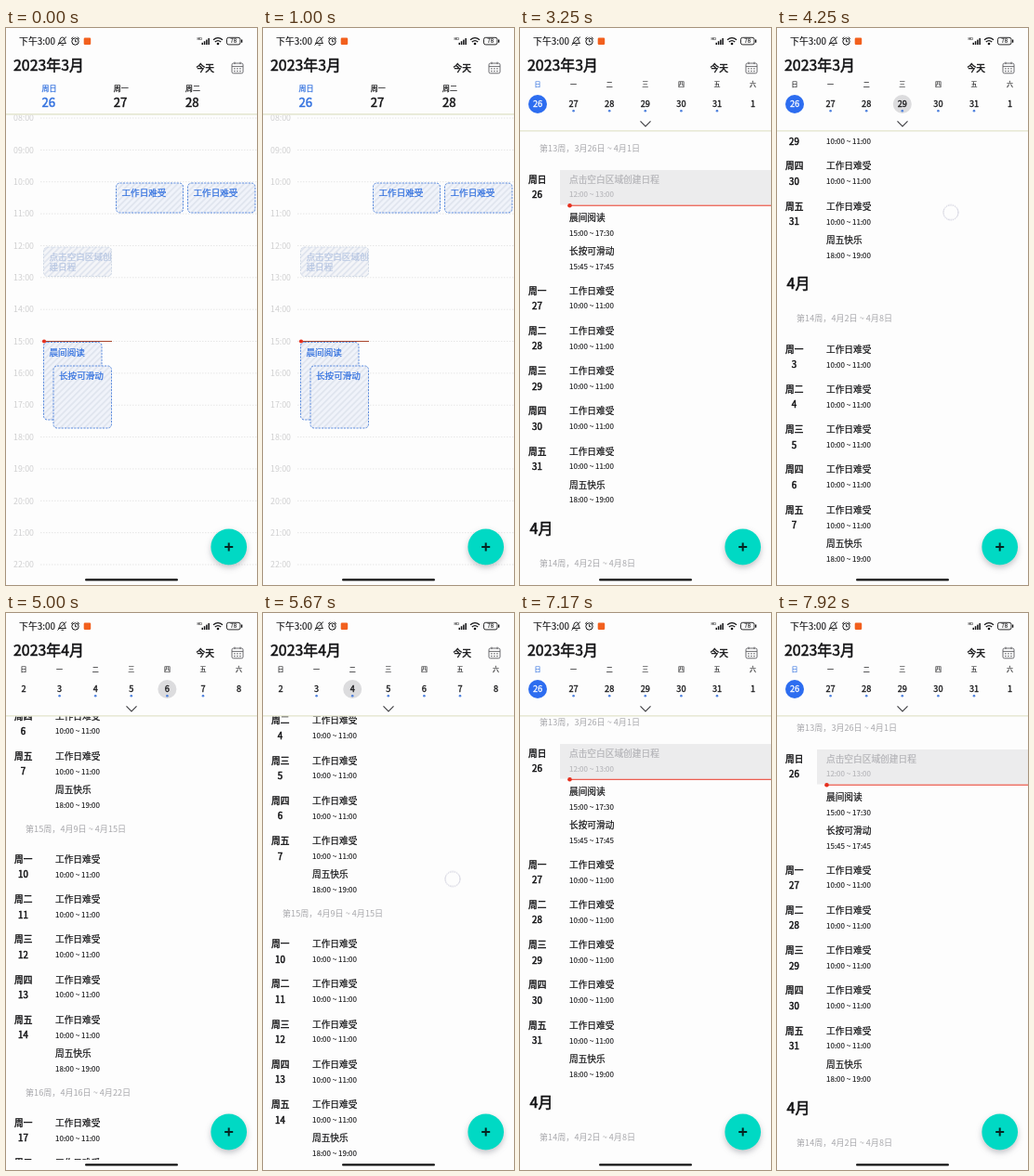
An HTML page for the animation above (8 s loop, 270 by 600 pixels).

```html
<!DOCTYPE html>
<html lang="zh-CN">
<head>
<meta charset="utf-8">
<title>日历</title>
<style>
  html, body { margin: 0; width: 100%; height: 100%; overflow: hidden; background: #fdfdfd; }
  svg { display: block; width: 100vw; height: 100vh; font-family: "Noto Sans CJK SC", "Noto Sans CJK", "Noto Sans", sans-serif; }
  #days, #agenda, #menu, #ripple, #list, #finger { animation: 8s linear infinite; }
  #days { animation-name: days; }
  #agenda { animation-name: agenda; }
  #menu { animation-name: menu; }
  #ripple { animation-name: ripple; }
  #list { animation-name: scroll; }
  #finger { animation-name: finger; }
  @keyframes days { 0%, 29.3% { visibility: visible } 29.31%, 100% { visibility: hidden } }
  @keyframes agenda { 0%, 29.3% { visibility: hidden } 29.31%, 100% { visibility: visible } }
  @keyframes menu {
    0%, 17.5% { opacity: 0; transform: translateY(-6px) }
    19.5%, 27.6% { opacity: 1; transform: none }
    29.3%, 100% { opacity: 0; transform: none }
  }
  @keyframes ripple {
    0%, 24.8% { opacity: 0; transform: scale(.3) }
    26%, 27% { opacity: 1; transform: scale(1) }
    28.5%, 100% { opacity: 0; transform: scale(1.8) }
  }
  @keyframes scroll {
    0%, 42.75% { transform: translateY(0); animation-timing-function: cubic-bezier(.4, 0, .8, .8) }
    53.125% { transform: translateY(-263px); animation-timing-function: cubic-bezier(.25, .4, .5, 1) }
    61.25% { transform: translateY(-625px) }
    66.25% { transform: translateY(-640px); animation-timing-function: cubic-bezier(.5, 0, .8, .6) }
    70.875% { transform: translateY(-538px) }
    75.625% { transform: translateY(-340px) }
    81.25% { transform: translateY(-160px); animation-timing-function: cubic-bezier(.25, .6, .4, 1) }
    93%, 100% { transform: translateY(-6px) }
  }
  @keyframes finger {
    0%, 42.7% { opacity: 0; transform: translate(187px, 462px) }
    42.75% { opacity: 1; transform: translate(187px, 462px); animation-timing-function: cubic-bezier(.4, 0, .8, .8) }
    53.125% { opacity: 1; transform: translate(187px, 199px) }
    53.8% { opacity: 0; transform: translate(187px, 180px) }
    66.2% { opacity: 0; transform: translate(204px, 184px) }
    66.25% { opacity: 1; transform: translate(204px, 184px); animation-timing-function: cubic-bezier(.5, 0, .8, .6) }
    70.875% { opacity: 1; transform: translate(204px, 286px) }
    75.625% { opacity: 1; transform: translate(204px, 484px) }
    76%, 100% { opacity: 0; transform: translate(204px, 490px) }
  }
</style>
</head>
<body>
<svg id="stage" viewBox="0 0 270 600"></svg>
<script>
const BG = '#fdfdfd', INK = '#121214', BLUE = '#3170df', PALE = '#cfcfd0', RED = '#e5301f', DIVIDER = '#e8e9d6';
const WEEKDAYS = '日一二三四五六';
const FIRST = 26, MARCH_END = 31;

const rect = (x, y, w, h, fill, extra = '') =>
  `<rect x="${x}" y="${y}" width="${w}" height="${h}" fill="${fill}" ${extra}/>`;
const circle = (x, y, r, fill, extra = '') =>
  `<circle cx="${x}" cy="${y}" r="${r}" fill="${fill}" ${extra}/>`;
const line = (d, color, width = 1, extra = '') =>
  `<path d="${d}" fill="none" stroke="${color}" stroke-width="${width}" ${extra}/>`;

// y is the visual middle of the glyphs; heavy adds a medium weight
const text = (x, y, str, size, { fill = INK, heavy = 0.22, anchor = 'start' } = {}) =>
  `<text x="${x}" y="${y + size * .37}" font-size="${size}" fill="${fill}"
    stroke="${fill}" stroke-width="${heavy}" text-anchor="${anchor}">${str}</text>`;

const dayNumber = d => d > MARCH_END ? d - MARCH_END : d;
const month = d => d > MARCH_END ? 4 : 3;
const dateLabel = d => `${month(d)}月${dayNumber(d)}日`;

function eventBox(x, y, w, h, lines, faded) {
  const edge = faded ? '#cdd6e4' : '#4f83dc', fill = faded ? '#b7c6e2' : BLUE;
  const shape = 'rx="4"';
  return rect(x, y, w, h, faded ? '#f4f5f8' : '#f0f3fa', shape) +
    rect(x, y, w, h, 'url(#hatch)', `${shape} stroke="${edge}" stroke-width=".9" stroke-dasharray="2.2 1.2"`) +
    lines.map((s, i) => text(x + 6, y + 10.5 + i * 11, s, 9.6, { fill })).join('');
}

function threeDays() {
  let out = '';
  for (let hour = 8; hour <= 22; hour++) {
    const y = 97 + (hour - 8) * 34.36;
    out += text(8, y, String(hour).padStart(2, '0') + ':00', 8.8, { fill: PALE, heavy: 0 }) +
      line(`M37 ${y}H270`, '#e0e0e0', .8, 'stroke-dasharray="1.5 1.5"');
  }
  out += eventBox(118.5, 167, 72, 32, ['工作日难受']) +
    eventBox(195.5, 167, 72.5, 32, ['工作日难受']) +
    eventBox(40.5, 236, 73, 31.5, ['点击空白区域创', '建日程'], true) +
    eventBox(40.5, 338.5, 62.5, 83.5, ['晨间阅读']) +
    eventBox(51, 364, 62.5, 67, ['长按可滑动']) +
    line('M41 337.5H114', '#a8452c', 1) + circle(41, 337.5, 2.1, RED) +
    rect(0, 0, 270, 92.5, BG) + rect(0, 92, 270, 1.8, DIVIDER);
  [0, 1, 2].forEach(i => {
    const x = 38.5 + i * 77.2, fill = i ? INK : BLUE;
    out += text(x, 65.5, '周' + WEEKDAYS[i], 8, { fill }) +
      text(x, 80, FIRST + i, 13.2, { fill, heavy: .45 });
  });
  return out;
}

const agendaDays = [];
const entry = (y, name, time, fill = INK) =>
  text(53, y, name, 9.7, { fill }) + text(53, y + 16.5, time, 8, { fill, heavy: .1 });
const dayLabel = (d, y) =>
  text(9, y, '周' + WEEKDAYS[(d - FIRST) % 7], 9.7, { heavy: .4 }) +
  text(18.5, y + 16.5, dayNumber(d), 9.7, { anchor: 'middle', heavy: .5 });

function agendaList() {
  let out = rect(43, 153, 227, 37.5, '#ececed') + dayLabel(FIRST, 163) +
    entry(163, '点击空白区域创建日程', '12:00 ~ 13:00', '#b4b4b8') +
    line('M53 191.2H270', RED, 1) + circle(53.5, 191.2, 2.3, RED) +
    entry(204.8, '晨间阅读', '15:00 ~ 17:30') +
    entry(240.8, '长按可滑动', '15:45 ~ 17:45') +
    text(10.5, 539, '4月', 16, { heavy: .6 });
  for (let week = 0; week < 4; week++) {
    const sunday = FIRST + week * 7, monday = week ? 326 + 284 * week : 283;
    out += text(21, week ? monday - 33 : 130,
      `第${13 + week}周，${dateLabel(sunday)} ~ ${dateLabel(sunday + 6)}`, 9.1, { fill: '#a8a8ac', heavy: 0 });
    for (let i = 0; i < 5; i++) {
      const y = monday + i * 43.25, d = sunday + 1 + i;
      agendaDays.push({ d, y });
      out += dayLabel(d, y) + entry(y, '工作日难受', '10:00 ~ 11:00');
    }
    out += entry(monday + 209, '周五快乐', '18:00 ~ 19:00');
  }
  return out;
}

function weekStrip(current) {
  const sunday = FIRST + 7 * Math.floor((current - FIRST) / 7);
  let out = '';
  for (let i = 0; i < 7; i++) {
    const x = 19 + i * 38.6, d = sunday + i, today = d === FIRST;
    if (today) out += circle(x, 82, 10, '#2d6df0');
    else if (d === current) out += circle(x, 82, 10, '#dcdcde');
    out += text(x, 60, WEEKDAYS[i], 7, { anchor: 'middle', heavy: .1, fill: today && d === current ? BLUE : INK }) +
      text(x, 82, dayNumber(d), 9.2, { anchor: 'middle', heavy: .3, fill: today ? '#fff' : INK });
    if (i > 0 && i < 6) out += circle(x, 89.3, 1.3, '#4c7fdc');
  }
  return out;
}

function statusBar() {
  const signal = [0, 1, 2, 3].map(i => rect(210.5 + i * 2.3, 15.8 - i * 1.6, 1.5, 2.2 + i * 1.6, INK)).join('');
  return text(14, 14, '下午3:00', 9.9, { heavy: .15 }) +
    line('M56.5 16.5Q58 15 58 12.5Q58.5 10 60.5 10Q63 10 63 13Q63 15 64.5 16.5ZM59.5 18.3H62M55.5 18.5L65 9.5', INK, .9) +
    circle(74.5, 14.5, 3.7, 'none', `stroke="${INK}"`) +
    line('M74.5 12.3V14.8H76.5M70 11.7L72.3 9.7M79 11.7L76.7 9.7', INK, .9) +
    rect(83.7, 10.5, 7.5, 7.5, '#f2601e', 'rx="1.2"') +
    text(205.5, 11.5, 'HD', 3.8, { heavy: .1 }) + signal +
    line('M223 12.8Q228 8.6 233 12.8M224.8 15Q228 12.3 231.2 15', INK, 1.3) + circle(228, 17, 1.3, INK) +
    rect(237.5, 10.3, 14.5, 7.6, 'none', `rx="2" stroke="${INK}" stroke-width=".9"`) +
    rect(253, 12.5, 1.3, 3.2, INK) + text(244.8, 14.1, '78', 6.2, { anchor: 'middle', heavy: .1 });
}

function toolbar() {
  const gray = '#5c5c60';
  const dots = [0, 1, 2, 3, 4, 5].map(i =>
    rect(245.2 + i % 3 * 3, 43.2 + Math.floor(i / 3) * 2.7, 1.4, 1.2, gray)).join('');
  return text(204.5, 43, '今天', 9.7, { heavy: .4 }) +
    rect(243, 38, 12, 10.8, 'none', `rx="1.6" stroke="${gray}" stroke-width=".9"`) +
    line('M243 41.4H255M246 36.6V39M252 36.6V39', gray, .9) + dots;
}

function menu() {
  const labels = ['三日', '单日', '单月', '列表'];
  return rect(135, 52.5, 140, 133.5, BG, 'filter="url(#soft)"') +
    `<g clip-path="url(#row)"><g id="ripple" style="transform-origin:194px 171px">
      <ellipse cx="196" cy="171" rx="36" ry="30" fill="url(#press)"/>
      ${circle(194, 171, 7.5, 'none', 'stroke="#c4c4cc" stroke-width=".8"')}</g></g>` +
    labels.map((s, i) => text(146, 70.3 + i * 33, s, 10.8)).join('');
}

document.getElementById('stage').innerHTML = `
  <defs>
    <pattern id="hatch" width="4.6" height="4.6" patternUnits="userSpaceOnUse" patternTransform="rotate(45)">
      ${rect(0, 0, 1.7, 4.6, '#dfe4ee')}
    </pattern>
    <radialGradient id="press">
      <stop offset="0" stop-color="#a0a0a4"/><stop offset=".5" stop-color="#b4b4b8"/>
      <stop offset="1" stop-color="#d8d8dc" stop-opacity="0"/>
    </radialGradient>
    <filter id="soft" x="-20%" y="-20%" width="140%" height="140%">
      <feDropShadow dx="0" dy="1" stdDeviation="2.2" flood-color="#80808a" flood-opacity=".4"/>
    </filter>
    <filter id="glow" x="-30%" y="-30%" width="160%" height="160%">
      <feDropShadow dx="0" dy="3" stdDeviation="3" flood-color="#80808c" flood-opacity=".45"/>
    </filter>
    <clipPath id="row">${rect(135, 153, 135, 33, '#000')}</clipPath>
  </defs>
  ${rect(0, 0, 270, 600, BG)}
  <g id="days">${threeDays()}</g>
  <g id="agenda">
    <g id="list">${agendaList()}</g>
    ${rect(0, 0, 270, 111, BG)}${rect(0, 110, 270, 1.6, DIVIDER)}
    <g id="strip"></g>
    ${line('M129.5 100.3L135 106L140.5 100.3', '#3c3c40', 1.1)}
  </g>
  ${statusBar()}<g id="heading"></g>${toolbar()}
  ${rect(0, 589, 270, 11, BG)}
  ${circle(239.7, 559, 19.4, '#04d9c4', 'filter="url(#glow)"')}
  ${line('M235.2 559H244.2M239.7 554.5V563.5', '#062522', 2)}
  <g id="menu">${menu()}</g>
  <g id="finger">${circle(0, 0, 8, BG, 'fill-opacity=".6" stroke="#b8b8cc" stroke-width=".9" stroke-dasharray="1.5 .8"')}</g>
  ${rect(85, 593.3, 100, 2.3, '#111', 'rx="1.1"')}`;

const list = document.getElementById('list');
const strip = document.getElementById('strip');
const heading = document.getElementById('heading');
let shown = null;

// The week strip follows the topmost day of the scrolled list.
function follow() {
  const shift = new DOMMatrix(getComputedStyle(list).transform).m42;
  const current = agendaDays.reduce((top, { d, y }) => y + shift < 130 ? d : top, FIRST);
  if (current !== shown) {
    shown = current;
    strip.innerHTML = weekStrip(current);
    heading.innerHTML = text(8, 40, `2023年${month(current)}月`, 15.9, { heavy: .5 });
  }
  requestAnimationFrame(follow);
}
follow();
</script>
</body>
</html>
```
